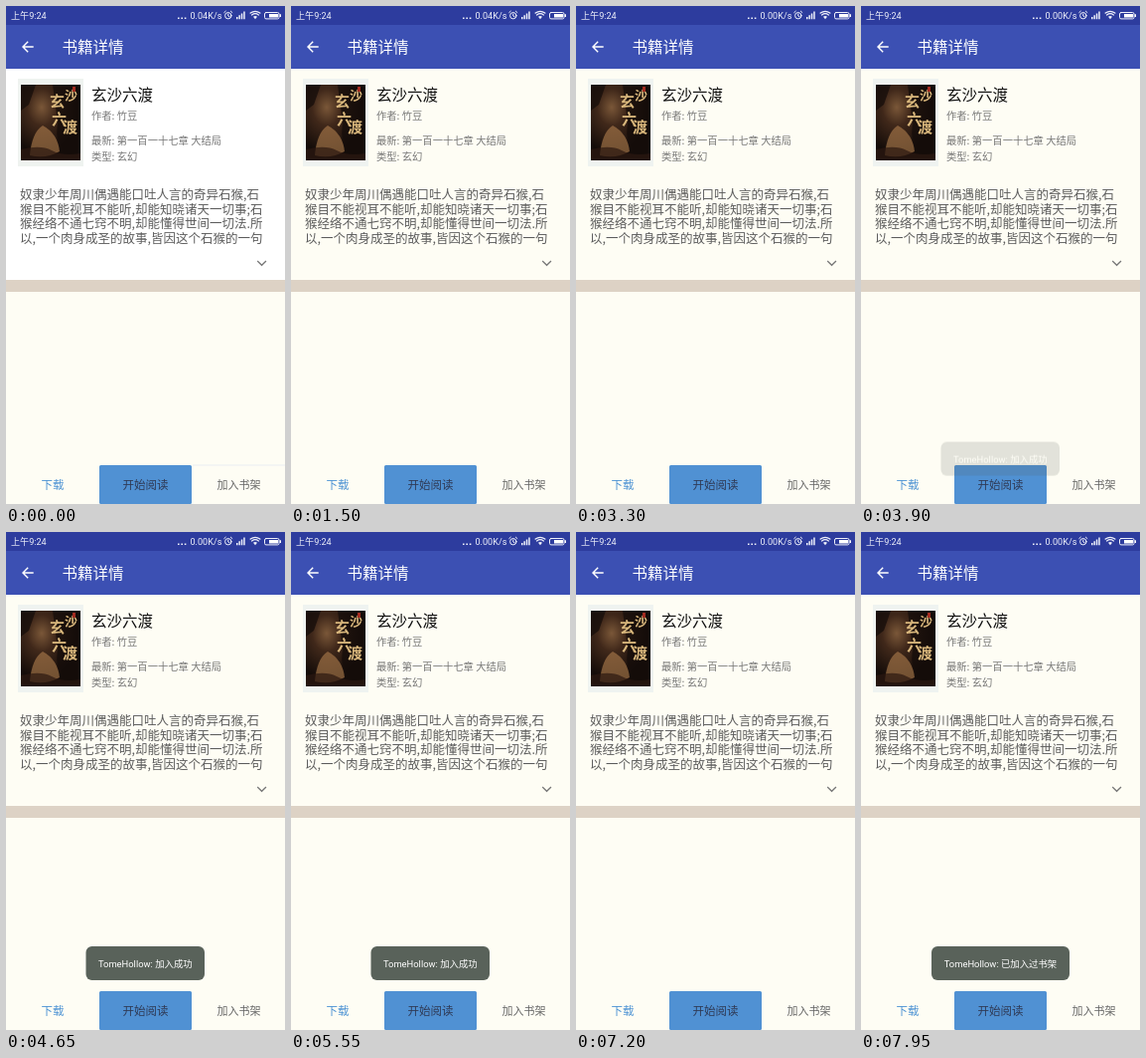
Recreate the animation shown at these times as an HTML page. Size 281 by 500 pixels, loop 8 s.

```html
<!DOCTYPE html>
<html lang="zh-CN">
<head>
<meta charset="utf-8">
<title>书籍详情</title>
<style>
html, body { margin: 0; width: 100%; height: 100%; overflow: hidden; background: #fefdf4; }
svg { display: block; width: 281px; height: 500px; font-family: Roboto, "Noto Sans CJK SC", "Noto Sans CJK", sans-serif; }
.meta, .intro { font-family: "Noto Sans CJK SC", "Noto Sans CJK", sans-serif; }
.head { font-size: 15.5px; fill: #fff; }
.name { font-size: 15.5px; fill: #111; }
.meta { font-size: 10.3px; fill: #777; }
.intro { font-size: 12.5px; fill: #5c5c5c; }
.status { font-size: 9.1px; fill: #eef0fa; }
.cover { font-size: 15px; font-weight: 700; fill: #d9b77c; }
.action { font-size: 11.5px; text-anchor: middle; }
.action .small { font-size: 11px; }
.toast text { font-size: 9.4px; fill: #fff; text-anchor: middle; }
.toast rect { fill: #59625a; }
.line { fill: none; stroke-linecap: square; }
.toast, .slow { opacity: 0; }
.fast { animation: fast 8s step-end infinite; }
.slow { animation: slow 8s step-end infinite; }
.added { animation: added 8s linear infinite; }
.already { animation: already 8s linear infinite; }
.first { animation: first 8s step-end infinite; }
@keyframes fast { 0% { opacity: 1; } 39.375%, 100% { opacity: 0; } }
@keyframes slow { 0% { opacity: 0; } 39.375%, 100% { opacity: 1; } }
@keyframes first { 0% { opacity: 1; } 9.375%, 100% { opacity: 0; } }
@keyframes added {
  0%, 48.1% { opacity: 0; transform: translateY(26px); }
  52%, 71.5% { opacity: 1; transform: none; }
  75.2%, 100% { opacity: 0; transform: translateY(26px); }
}
@keyframes already {
  0%, 91.5% { opacity: 0; transform: translateY(26px); }
  95.4%, 100% { opacity: 1; transform: none; }
}
</style>
</head>
<body>
<svg viewBox="0 0 281 500">
  <defs>
    <radialGradient id="glow" cx=".35" cy=".3" r=".6">
      <stop offset="0" stop-color="#7a5738"/>
      <stop offset=".4" stop-color="#40281a"/>
      <stop offset="1" stop-color="#140c09"/>
    </radialGradient>
  </defs>

  <rect width="281" height="500" fill="#fefdf4"/>
  <rect class="first" y="63" width="281" height="212" fill="#fff"/>
  <rect y="275" width="281" height="12" fill="#ddd2c5"/>
  <rect y="19" width="281" height="44" fill="#3c50b3"/>
  <rect width="281" height="19" fill="#2d3c9e"/>

  <!-- status bar -->
  <g class="status">
    <text x="5" y="13">上午9:24</text>
    <text class="fast" x="185.5" y="13">0.04K/s</text>
    <text class="slow" x="185.5" y="13">0.00K/s</text>
    <path d="M173 11.5h1.6v1.6h-1.6zM176.4 11.5h1.6v1.6h-1.6zM179.8 11.5h1.6v1.6h-1.6z"/>
    <path d="M232 11h1.5v2.2h-1.5zM234.4 9.3h1.5v3.9h-1.5zM236.8 7.5h1.5v5.7h-1.5zM239.2 5.6h1.5v7.6h-1.5z"/>
    <path d="M251 13.2l-2-2.4q2-1.4 4 0z"/>
  </g>
  <g class="line" stroke="#eef0fa">
    <circle cx="223.8" cy="9.7" r="3.2"/>
    <path d="M223.8 8v2l1.3.8M219.8 6.5l1.4-1.3M227.8 6.5l-1.4-1.3"/>
    <path d="M247.6 9q3.4-2.6 6.8 0M246.2 7.1q4.8-3.5 9.6 0" stroke-width="1.2"/>
    <rect x="260.5" y="6.5" width="14.5" height="6.4" rx="1.5"/>
  </g>
  <path d="M265 8h9v3.5h-9zM275.6 8.3h1.4v2.8h-1.4z" fill="#fff"/>

  <!-- app bar -->
  <path class="line" d="M27 41H17.2M21.7 36.2L17 41l4.7 4.8" stroke="#fff" stroke-width="1.4"/>
  <text class="head" x="56.5" y="46.5">书籍详情</text>

  <!-- cover -->
  <rect x="12" y="73" width="66" height="88" fill="#eff3f0"/>
  <rect x="15" y="79" width="60" height="76" fill="url(#glow)"/>
  <path d="M15 79h15l-7 20-8 6zM47 79h28v76H58q-9-17-6-39z" fill="#150c0a" opacity=".75"/>
  <path d="M24 150q2-23 13-30 15 8 17 26-14 8-30 4z" fill="#a8794a" opacity=".65"/>
  <path d="M15 144q20-5 31 1t29 3v7H15z" fill="#2b1710" opacity=".7"/>
  <g class="cover">
    <text x="44" y="101">玄</text>
    <text x="59" y="94" font-size="13">沙</text>
    <text x="46" y="119">六</text>
    <text x="57" y="127">渡</text>
  </g>
  <rect x="67" y="81" width="3" height="5" fill="#a32b20"/>

  <!-- details -->
  <text class="name" x="86" y="95">玄沙六渡</text>
  <g class="meta">
    <text x="86" y="113.5">作者: 竹豆</text>
    <text x="86" y="139">最新: 第一百一十七章 大结局</text>
    <text x="86" y="155">类型: 玄幻</text>
  </g>
  <g class="intro">
    <text x="14" y="193.5">奴隶少年周川偶遇能口吐人言的奇异石猴,石</text>
    <text x="14" y="208.5">猴目不能视耳不能听,却能知晓诸天一切事;石</text>
    <text x="14" y="223.3">猴经络不通七窍不明,却能懂得世间一切法.所</text>
    <text x="14" y="238.2">以,一个肉身成圣的故事,皆因这个石猴的一句</text>
  </g>
  <path class="line" d="M253.7 256.4l3.9 3.9 3.9-3.9" stroke="#777" stroke-width="1.3"/>

  <!-- actions -->
  <path class="first" d="M188 461h93" stroke="#e9eef2"/>
  <rect x="94" y="461" width="93" height="39" rx="1.5" fill="#5091d3"/>
  <g class="action">
    <text x="47" y="485" fill="#4a91d3">下载</text>
    <text x="140.5" y="485" fill="#2f3a55">开始阅读</text>
    <text class="small" x="234.5" y="485" fill="#666">加入书架</text>
  </g>

  <!-- toasts -->
  <g class="toast added">
    <rect x="80.5" y="416" width="119.5" height="34" rx="6"/>
    <text x="140.3" y="436.8">TomeHollow: 加入成功</text>
  </g>
  <g class="toast already">
    <rect x="71" y="416" width="139" height="34" rx="6"/>
    <text x="140.5" y="436.8">TomeHollow: 已加入过书架</text>
  </g>
</svg>
</body>
</html>
```
